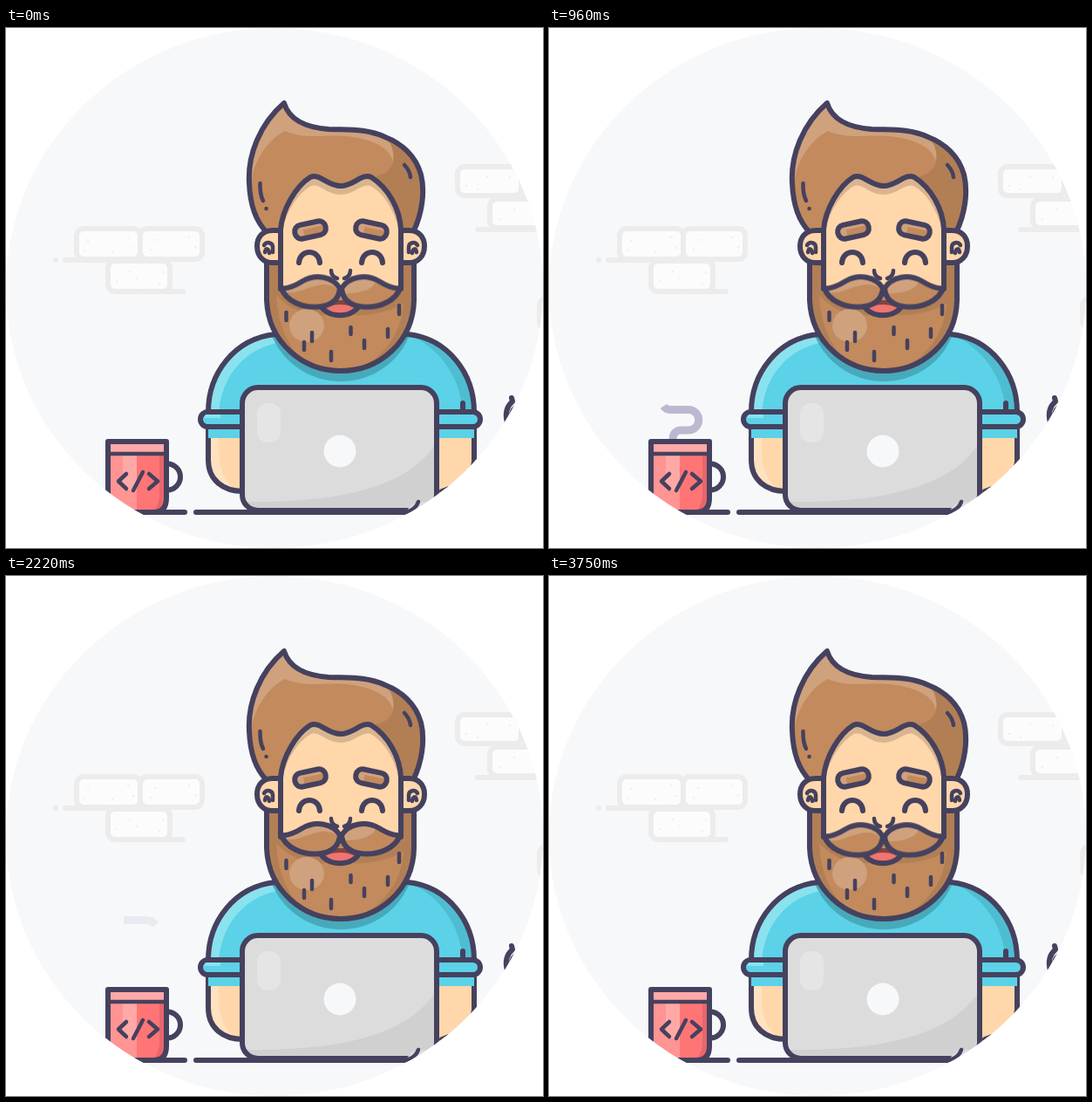
Animation, 616 px wide and 596 px high, one loop 3.78 s. Source, as an HTML page:

```html
<!DOCTYPE html>
<html lang="en">
<head>
<meta charset="utf-8">
<title>At the desk</title>
<style>
  html, body { margin: 0; width: 100%; height: 100%; overflow: hidden; background: #fff; }
  svg { display: block; width: 616px; height: 596px; }
  .line { fill: none; stroke: #45415e; stroke-width: 6; stroke-linecap: round; stroke-linejoin: round; }
  .thin { stroke-width: 4.5; }
  .wall { fill: #fcfcfc; stroke: #ececec; stroke-width: 6; stroke-linecap: round; }
  .hair { fill: #c28a5d; }
  .hairLight { fill: #cfa17d; }
  .hairDark { fill: #b27f55; }
  .skin { fill: #ffd7aa; }
  .skinDark { fill: #d9b58f; }
  .shirt { fill: #5bd2e7; }

  .head { animation: nod 945ms ease-in-out infinite; }
  .stache { animation: sway 945ms ease-in-out infinite; }
  .mouth { animation: open 945ms ease-in-out infinite; }
  .steam {
    fill: none; stroke: #bcb8d0; stroke-width: 9;
    animation: rise 3780ms linear infinite, fade 3780ms linear infinite;
  }
  @keyframes nod {
    0%, 43%, 92%, 100% { transform: translateY(0); }
    66.7% { transform: translateY(3px); }
  }
  @keyframes sway {
    0%, 92%, 100% { transform: translateY(1.2px); }
    35%, 43% { transform: translateY(0); }
    66.7% { transform: translateY(.6px); }
  }
  @keyframes open {
    0%, 43%, 92%, 100% { transform: translateY(0); }
    66.7% { transform: translateY(2.5px); }
  }
  @keyframes rise {
    0%, 8.2% { stroke-dasharray: 0 400; stroke-dashoffset: 0; }
    32.5% { stroke-dasharray: 132 400; stroke-dashoffset: 0; }
    45.2% { stroke-dasharray: 124 400; stroke-dashoffset: -78; }
    65.3%, 100% { stroke-dasharray: 0 400; stroke-dashoffset: -202; }
  }
  @keyframes fade {
    0%, 37% { opacity: 1; }
    64.8%, 100% { opacity: 0; }
  }
</style>
</head>
<body>
<svg viewBox="0 0 616 596">
  <defs>
    <clipPath id="stage"><ellipse cx="308" cy="298" rx="308" ry="298"/></clipPath>
    <path id="hair" d="M319 86C291 110 277 146 279 178C280 203 287 222 299 234L384 262L467 234C477 214 481 188 476 168C470 146 453 132 435 125C413 115 393 117 370 116C344 114 325 106 319 86Z"/>
    <path id="beard" d="M299 262V312C301 360 340 393 384 393C428 393 467 360 468 312V262Z"/>
    <path id="face" d="M315 299V231C317 207 333 181 349 171C360 166 368 181 384 181C399 181 408 166 419 171C438 183 452 207 453 231V299"/>
    <path id="shirt" d="M309 351C262 356 232 396 232 442V470H537V442C537 396 507 356 461 351Z"/>
    <path id="half" d="M383 297C375 284 356 280 340 289C332 294 324 298 316 297C320 310 339 321 361 318C375 316 382 309 383 297Z"/>
    <path id="mug" d="M117 474H184V539Q184 555 169 555H117Z"/>
    <rect id="lid" x="271" y="412" width="223" height="141" rx="18"/>
    <rect id="brow" x="-18" y="-8" width="36" height="16" rx="7.5"/>
    <g id="ear">
      <path class="line skin" d="M315 232H306C294 232 288 240 288 250C288 262 296 269 305 269H315Z"/>
      <path class="line thin" d="M296 249C299 244 306 246 306 251V257M297 257C298 252 301 252 302 258"/>
    </g>
    <clipPath id="inHair"><use href="#hair"/></clipPath>
    <clipPath id="inBeard"><use href="#beard"/></clipPath>
    <clipPath id="inFace"><use href="#face"/></clipPath>
    <clipPath id="inShirt"><use href="#shirt"/></clipPath>
    <clipPath id="inMug"><use href="#mug"/></clipPath>
    <clipPath id="inLid"><use href="#lid"/></clipPath>
    <clipPath id="inHalf"><use href="#half"/></clipPath>
    <clipPath id="inBrow"><use href="#brow"/></clipPath>
    <clipPath id="inMouth"><path d="M358 312C364 335 402 335 408 312Z"/></clipPath>
  </defs>

  <g clip-path="url(#stage)">
    <rect width="616" height="596" fill="#f7f8fa"/>

    <g class="wall">
      <rect x="81" y="230" width="73" height="35" rx="8"/>
      <rect x="154" y="230" width="71" height="35" rx="8"/>
      <rect x="117" y="267" width="71" height="35" rx="8"/>
      <path d="M57 266h.1M68 266H118M160 302H203"/>
      <rect x="518" y="159" width="73" height="33" rx="8"/>
      <rect x="591" y="159" width="73" height="33" rx="8"/>
      <rect x="555" y="196" width="73" height="33" rx="8"/>
      <path d="M541 231H616"/>
      <rect x="612" y="310" width="60" height="34" rx="8"/>
      <path fill="none" stroke-width="2" d="M90 255h.1M94 244h.1M122 256h.1M140 240h.1M146 252h.1M166 254h.1M171 243h.1M210 240h.1M217 251h.1M127 290h.1M142 279h.1M150 287h.1M176 293h.1M180 280h.1M528 181h.1M541 185h.1M552 170h.1M578 171h.1M566 219h.1M583 208h.1"/>
    </g>

    <path class="line" fill="#45415e" d="M575 452C572 441 575 433 581 428L580 424M584 455C578 448 578 438 588 433"/>

    <!-- mug -->
    <path class="steam" d="M142 474V472Q142 461 152 461H160A11.75 11.75 0 0 0 160 437.5H139A9 9 0 0 1 139 419.5H161A12.5 12.5 0 0 0 161 394.5H135"/>
    <circle class="line" cx="185" cy="514.500" r="15"/>
    <use href="#mug" fill="#ff7576"/>
    <g clip-path="url(#inMug)">
      <path fill="#ff9492" d="M117 488H150V555H117Z"/>
      <path fill="#ffa9a7" d="M117 474H184V488H117ZM134 488H150V530H134Z"/>
      <path fill="#e8666b" d="M176 488H184V555H168Q177 546 176 530Z"/>
    </g>
    <use href="#mug" class="line"/>
    <path class="line thin" d="M117 488H184"/>
    <path class="line thin" d="M138 511L129 519.500L138 528M157 509L146 530M164 511L174 519.500L164 528"/>

    <!-- body -->
    <path class="skin" d="M232 450V495C232 518 249 531 272 531V450ZM494 450H537V531H494Z"/>
    <path fill="#ffe2c0" d="M235 466H244V490Q246 515 262 529Q235 520 235 495Z"/>
    <path class="skinDark" d="M232 458H272V467H232ZM494 458H537V467H494Z"/>
    <path class="line" d="M232 460V495C232 518 249 531 272 531M537 460V497Q535 520 500 531"/>
    <use href="#shirt" class="shirt"/>
    <g clip-path="url(#inShirt)">
      <path fill="#8ae2ef" d="M232 442C232 396 262 356 309 351L316 360C276 366 247 397 244 442Z"/>
      <path fill="#4ebdd2" d="M537 442C537 396 507 356 461 351C497 366 522 400 524 442Z"/>
      <g class="head"><use href="#beard" y="12" fill="#48a9bb"/></g>
    </g>
    <path class="line" d="M232 440C232 396 262 356 309 351M461 351C507 356 537 396 537 440M524 430V440"/>
    <rect class="line shirt" x="223" y="440" width="80" height="17" rx="8.5"/>
    <rect class="line shirt" x="464" y="440" width="80" height="17" rx="8.5"/>
    <path fill="#8ae2ef" d="M229 443H246V447H227Z"/>

    <g class="head">
      <!-- hair -->
      <use href="#hair" class="hair"/>
      <g clip-path="url(#inHair)">
        <path class="hairLight" d="M319 82C289 110 274 150 280 186C282 154 299 129 320 118C347 130 370 119 404 126C427 131 443 140 445 158C454 134 428 110 370 113Z"/>
        <path class="hairDark" d="M436 122C452 150 444 166 424 170L458 236H490V130Z"/>
      </g>
      <use href="#hair" class="line"/>
      <path class="line thin" d="M291.500 178Q291 190 295 198M298.500 207h.1M457 157Q463 163 464 171"/>

      <!-- beard -->
      <use href="#beard" class="hair"/>
      <g clip-path="url(#inBeard)">
        <path class="hairDark" d="M299 262H316V300Q345 330 384 318Q430 330 453 300V262H470V400H384C430 385 454 352 456 316Q425 333 384 328Q335 335 310 306Q312 360 350 390L299 370Z"/>
        <ellipse class="hairLight" cx="345" cy="341" rx="20" ry="19"/>
      </g>
      <use href="#beard" class="line"/>
      <path class="line thin" d="M321.500 326V335M342 360V369M351 349V359M373 371V381M395.500 343V351M411 358V367M438 345V354M451 318V328"/>

      <use href="#ear"/>
      <use href="#ear" transform="matrix(-1 0 0 1 768 0)"/>

      <!-- face -->
      <use href="#face" class="skin"/>
      <g clip-path="url(#inFace)">
        <path class="skinDark" d="M315 240V160H453V240C447 212 435 190 418 181C407 178 400 191 384 191C367 191 361 178 350 181C334 190 320 212 315 240Z"/>
      </g>
      <use href="#face" class="line"/>
      <g transform="translate(349 231.500) rotate(-12)">
        <use href="#brow" class="hair"/>
        <path class="hairLight" clip-path="url(#inBrow)" d="M-18-8H18V-2H-8V8H-18Z"/>
        <use href="#brow" class="line"/>
      </g>
      <g transform="translate(419 231.500) rotate(12)">
        <use href="#brow" class="hair"/>
        <path class="hairLight" clip-path="url(#inBrow)" d="M-18-8H18V-2H-8V8H-18Z"/>
        <use href="#brow" class="line"/>
      </g>
      <path class="line" d="M336 269C337 253 359 253 360 269M408 269C409 253 431 253 432 269"/>
      <path class="line thin" d="M373 278Q373 285 380 287M395 278Q395 285 388 287"/>

      <g class="mouth">
        <g clip-path="url(#inMouth)">
          <rect x="350" y="300" width="66" height="40" fill="#80453f"/>
          <ellipse cx="383" cy="327" rx="22" ry="10" fill="#f0746f"/>
        </g>
        <path class="line" stroke-width="5" d="M358 312C364 335 402 335 408 312"/>
      </g>

      <g class="stache">
        <use href="#half" class="hair"/>
        <path class="hairLight" clip-path="url(#inHalf)" d="M383 280H330L312 300C335 306 340 297 357 294Q372 290 383 300Z"/>
        <use href="#half" class="line"/>
        <g transform="matrix(-1 0 0 1 768 0)">
          <use href="#half" class="hair"/>
          <path class="hairLight" clip-path="url(#inHalf)" d="M383 280H350C335 290 350 304 383 303Z"/>
          <use href="#half" class="line"/>
        </g>
      </g>
    </g>

    <!-- desk and laptop -->
    <path class="line" d="M120 555H205M218 555H500"/>
    <use href="#lid" fill="#dcdcdc"/>
    <g clip-path="url(#inLid)">
      <path fill="#d0d0d0" d="M271 543C385 545 465 525 494 474V553H271Z"/>
      <rect x="288" y="430" width="27" height="45" rx="12" fill="#e5e5e5"/>
    </g>
    <use href="#lid" class="line"/>
    <circle cx="383" cy="485" r="18.500" fill="#f7f8fa"/>
    <path fill="#dcdcdc" d="M458 558Q461 546 473 543H510V560Z"/>
    <path class="line thin" d="M459 555Q470 552 473 543"/>
    <path class="line" d="M494 500V535"/>
  </g>
</svg>
</body>
</html>
```
